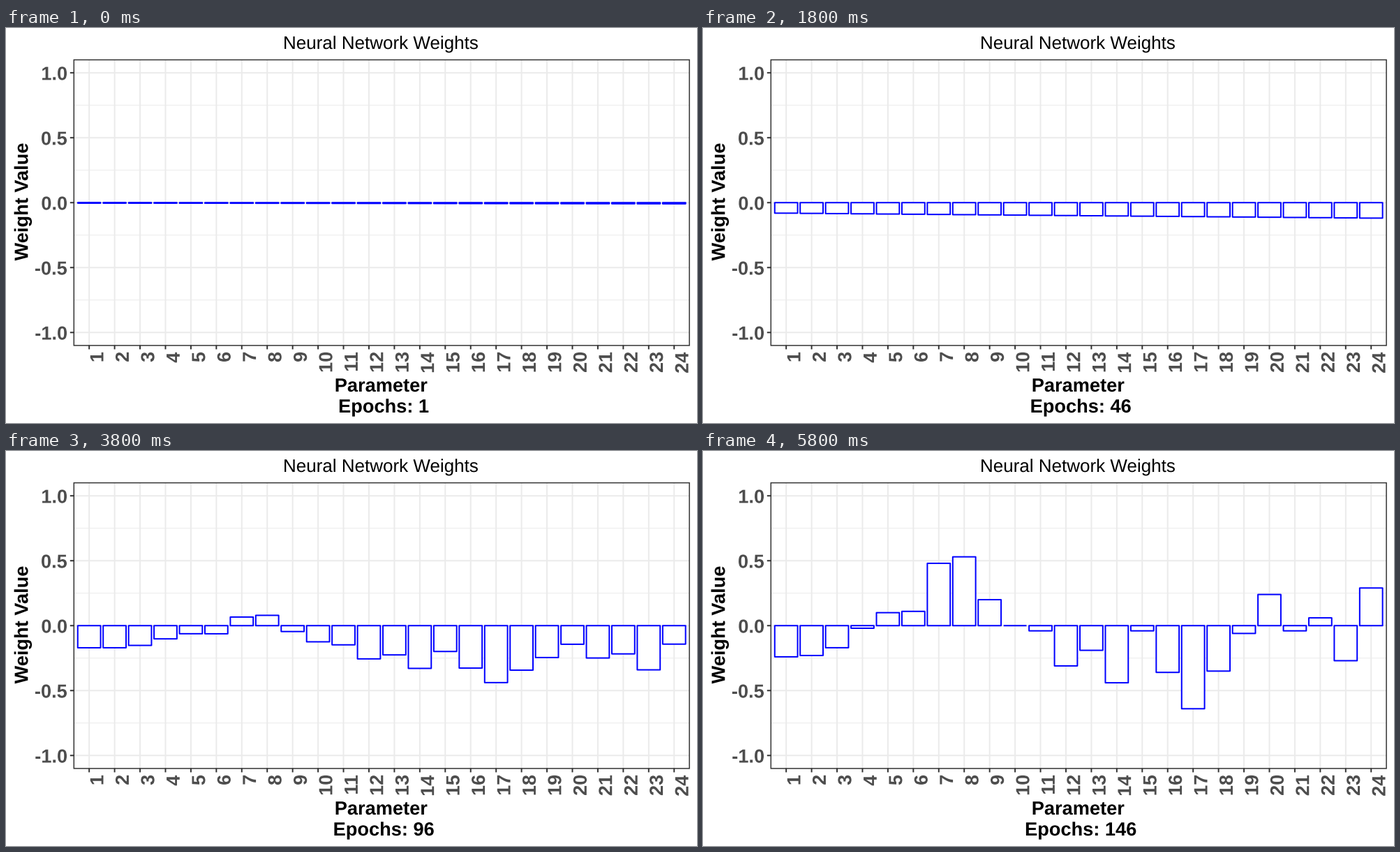
Write a matplotlib script that moves like this. It is 990 by 566 pixels and loops after 6000 ms.

```python
import numpy as np
import matplotlib.pyplot as plt
from matplotlib.animation import FuncAnimation
from matplotlib.patches import PathPatch, Rectangle
from matplotlib.textpath import TextPath
from matplotlib.transforms import Affine2D

W, H, DPI = 990, 566, 100
FRAMES, INTERVAL, EPOCH_STEP = 30, 200, 5
N = 24
LEFT, RIGHT, TOP, BOTTOM = 97.3, 979.1, 45.6, 454.9
STEP = (RIGHT - LEFT) / (N + 0.2)
UNIT = (BOTTOM - TOP) / 2.2
ZERO = (TOP + BOTTOM) / 2
INK, GREY, GRID, DARK, BLUE = "black", "#4d4d4d", "#ebebeb", "#333333", "#0000ff"
BOLD = 27.2

# Weights = level + tilt * ramp + bend * step + gain * trained
params = np.arange(1, N + 1)
ramp = (params - 1) / (N - 1)
step = 1 / (1 + np.exp((14 - params) / 2))
trained = np.array([-.24, -.23, -.17, -.02, .10, .11, .48, .53, .20, 0, -.04, -.31,
                    -.19, -.44, -.04, -.36, -.64, -.35, -.06, .24, -.04, .06, -.27, .29])
basis = np.array([np.ones(N), ramp, step, trained])

KEYS = np.array([0, 4, 9, 13, 17, 21, 29])
MIX = np.array([  # level, tilt, bend, gain
    [-.003, -.006, 0, 0],
    [.017, -.028, 0, 0],
    [-.081, -.038, 0, 0],
    [-.172, -.068, 0, .076],
    [-.162, -.09, -.035, .233],
    [0, -.06, -.13, .5],
    [0, 0, 0, 1],
])
SLOPES = np.gradient(MIX, KEYS, axis=0)


def weights_at(t):
    """Cubic Hermite blend of the mix through the key moments."""
    k = min(np.searchsorted(KEYS, t, side="right") - 1, len(KEYS) - 2)
    d = KEYS[k + 1] - KEYS[k]
    u = (t - KEYS[k]) / d
    ease = u * u * (3 - 2 * u)
    mix = (MIX[k] * (1 - ease) + MIX[k + 1] * ease
           + d * u * (1 - u) ** 2 * SLOPES[k]
           - d * u * u * (1 - u) * SLOPES[k + 1])
    return mix @ basis


def text_path(s, x, y, size=BOLD, weight="bold", align=0.5, angle=0):
    path = TextPath((0, 0), s, size=size,
                    prop={"family": "Liberation Sans", "weight": weight})
    box = path.get_extents()
    anchor = box.x0 + align * box.width
    place = (Affine2D().translate(-anchor, 0).scale(1, -1)
             .rotate_deg(-angle).translate(x, y))
    return place.transform_path(path)


def label(s, x, y, color=INK, **kw):
    patch = PathPatch(text_path(s, x, y, **kw), fc=color, lw=0, zorder=5)
    return ax.add_patch(patch)


def line(x, y, color, px, z):
    ax.plot(x, y, color=color, lw=px * 0.72, solid_capstyle="butt",
            zorder=z, snap=False)


def epoch_path(i):
    return text_path(f"Epochs: {1 + EPOCH_STEP * i}", 541.6, 551)


fig = plt.figure(figsize=(W / DPI, H / DPI), dpi=DPI, facecolor="white")
ax = fig.add_axes([0, 0, 1, 1])
ax.set_xlim(0, W)
ax.set_ylim(H, 0)
ax.axis("off")

for v in np.arange(-1, 1.1, 0.25):
    y = ZERO - v * UNIT
    major = v % 0.5 == 0
    line([LEFT, RIGHT], [y, y], GRID, 2 if major else 1, 1)
    if major:
        line([LEFT - 5.5, LEFT], [y, y], DARK, 2, 4)
        label(f"{v:.1f}", 87, y + 10.2, GREY, align=1)

centers = LEFT + (params - 0.4) * STEP
for p, x in zip(params, centers):
    line([x, x], [TOP, BOTTOM], GRID, 2, 1)
    line([x, x], [BOTTOM, BOTTOM + 5.5], DARK, 2, 4)
    label(str(p), x + 20.3, 464.8, GREY, align=1, angle=90)

ax.add_patch(Rectangle((LEFT, TOP), RIGHT - LEFT, BOTTOM - TOP, fill=False,
                       ec=DARK, lw=1.5 * 0.72, zorder=4, snap=False))
label("Neural Network Weights", 537.5, 30, size=26, weight="normal")
label("Parameter", 538, 521)
label("Weight Value", 31.3, 249.5, angle=90)
epochs = ax.add_patch(PathPatch(epoch_path(0), fc=INK, lw=0, zorder=5))

bars = [ax.add_patch(Rectangle((x - 0.45 * STEP, ZERO), 0.9 * STEP, 0,
                               fc="white", ec=BLUE, lw=2 * 0.72,
                               joinstyle="round", zorder=3, snap=False))
        for x in centers]


def update(i):
    for bar, w in zip(bars, weights_at(i)):
        bar.set_height(-w * UNIT)
    epochs.set_path(epoch_path(i))
    return [*bars, epochs]


anim = FuncAnimation(fig, update, frames=FRAMES, interval=INTERVAL,
                     repeat=True, repeat_delay=0, blit=False)
plt.show()
```
